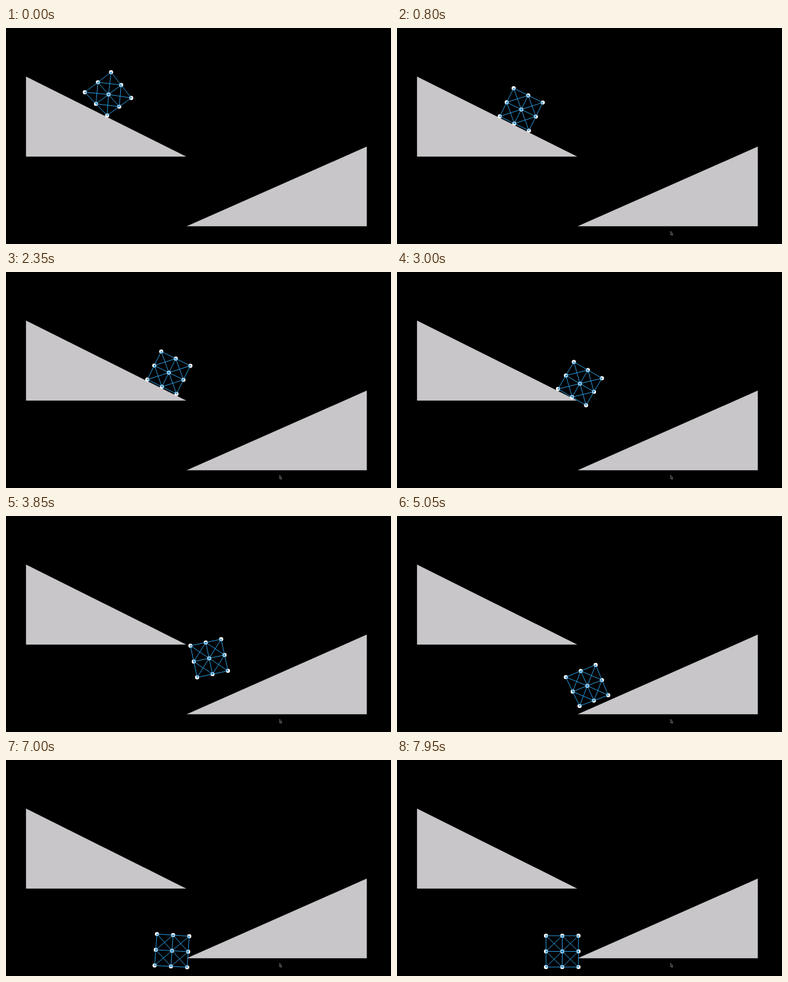
Animation, 600 px wide and 338 px high, one loop 8 s. Source, as an HTML page:

```html
<!DOCTYPE html>
<html lang="en">
<head>
<meta charset="utf-8">
<title>Soft body on slopes</title>
<style>
  html, body { margin: 0; width: 100%; height: 100%; overflow: hidden; background: #000; }
  svg { display: block; width: 100vw; height: 100vh; }
</style>
</head>
<body>
<svg viewBox="0 0 600 338" preserveAspectRatio="none">
  <g fill="#c8c6c9">
    <path d="M31.2 76L281 201.2H31.2Z"/>
    <path d="M281.5 310.3L562.3 185.5V310.3Z"/>
  </g>
  <path id="cursor" d="M426.4 318V323.7L427.6 322.7L428.5 324.7L429.3 324.3L428.5 322.3H430Z"
        fill="#111" stroke="#999" stroke-width=".6"/>
  <g id="dots" fill="#fff"></g>
  <path id="springs" fill="none" stroke="#2798dc"/>
  <g id="marks" fill="#16324a"></g>
</svg>
<script>
const LOOP = 8000, N = 3;
const HALF_W = 25.3, HALF_H = 24.5;
const $ = id => document.getElementById(id);

const smooth = p => p * p * (3 - 2 * p);
const outQuad = p => 1 - (1 - p) ** 2;
const outCubic = p => 1 - (1 - p) ** 3;

function mix(from, to, p) {
  const out = {};
  for (const key in from) out[key] = from[key] + (to[key] - from[key]) * p;
  return out;
}

// Lands on a corner, drops flat, then accelerates down the slope.
function slide(t) {
  const drop = Math.max(0, 1 - t / 0.7) ** 2, s = t - 0.85;
  const x = 195.3 + 33 * s + 4 * s * s;
  return {
    x: x - 10.3 * drop,
    y: x / 2 + 30.6 - 11.7 * drop,
    angle: 26.2 + 22.9 * drop,
    skew: 4.1 * drop
  };
}

// Tips over the edge and falls until it meets the lower slope.
const edge = slide(2.55);
function fall(s) {
  return {
    x: edge.x + 53.5 * s - 9.4 * s * s,
    y: edge.y + 18 * s + 22 * s * s,
    angle: edge.angle + Math.min(27.6 * s ** 2.4, 53),
    skew: 0
  };
}

const landed = fall(1.7);
const slid = { x: 296.6, y: 265.7, angle: 66.1, skew: 2.3 };
const tipped = { x: 265.7, y: 292.5, angle: 24.3, skew: 3.8 };
const rest = { x: 257.5, y: 299.5, angle: 0, skew: 0 };

function poseAt(t) {
  if (t < 2.55) return slide(t);
  if (t < 4.25) return fall(t - 2.55);
  if (t < 5.05) return mix(landed, slid, outQuad((t - 4.25) / 0.8));
  if (t < 6.1) return mix(slid, tipped, smooth((t - 5.05) / 1.05));
  return mix(tipped, rest, outCubic((t - 6.1) / 1.9));
}

const cells = Array.from({ length: N * N }, (_, k) => [k % N - 1, Math.floor(k / N) - 1]);

function nodesAt(t) {
  const { x, y, angle, skew } = poseAt(t);
  const rad = Math.PI / 180, a = angle * rad, b = (angle + 90 + skew) * rad;
  return cells.map(([u, v]) => [
    x + u * HALF_W * Math.cos(a) + v * HALF_H * Math.cos(b) + u * v * skew * 0.2,
    y + u * HALF_W * Math.sin(a) + v * HALF_H * Math.sin(b) - u * v * skew * 0.25
  ]);
}

// Every node is joined to its neighbours, diagonals included.
const links = [];
cells.forEach(([u, v], i) => cells.forEach(([p, q], j) => {
  if (j > i && Math.abs(p - u) < 2 && Math.abs(q - v) < 2) links.push([i, j]);
}));

function addCircles(group, r) {
  return cells.map(() => {
    const c = document.createElementNS(group.namespaceURI, "circle");
    c.setAttribute("r", r);
    return group.appendChild(c);
  });
}
const circles = [addCircles($("dots"), 3.2), addCircles($("marks"), 0.6)];

function draw(ms) {
  const nodes = nodesAt(ms / 1000);
  for (const set of circles)
    set.forEach((c, i) => {
      c.setAttribute("cx", nodes[i][0]);
      c.setAttribute("cy", nodes[i][1]);
    });
  $("springs").setAttribute("d",
    links.map(([i, j]) => `M${nodes[i]}L${nodes[j]}`).join(""));
  $("cursor").style.display = ms < 50 ? "none" : "";
}

let start;
function tick(now) {
  start ??= now;
  draw((now - start) % LOOP);
  requestAnimationFrame(tick);
}
draw(0);
requestAnimationFrame(tick);
</script>
</body>
</html>
```
